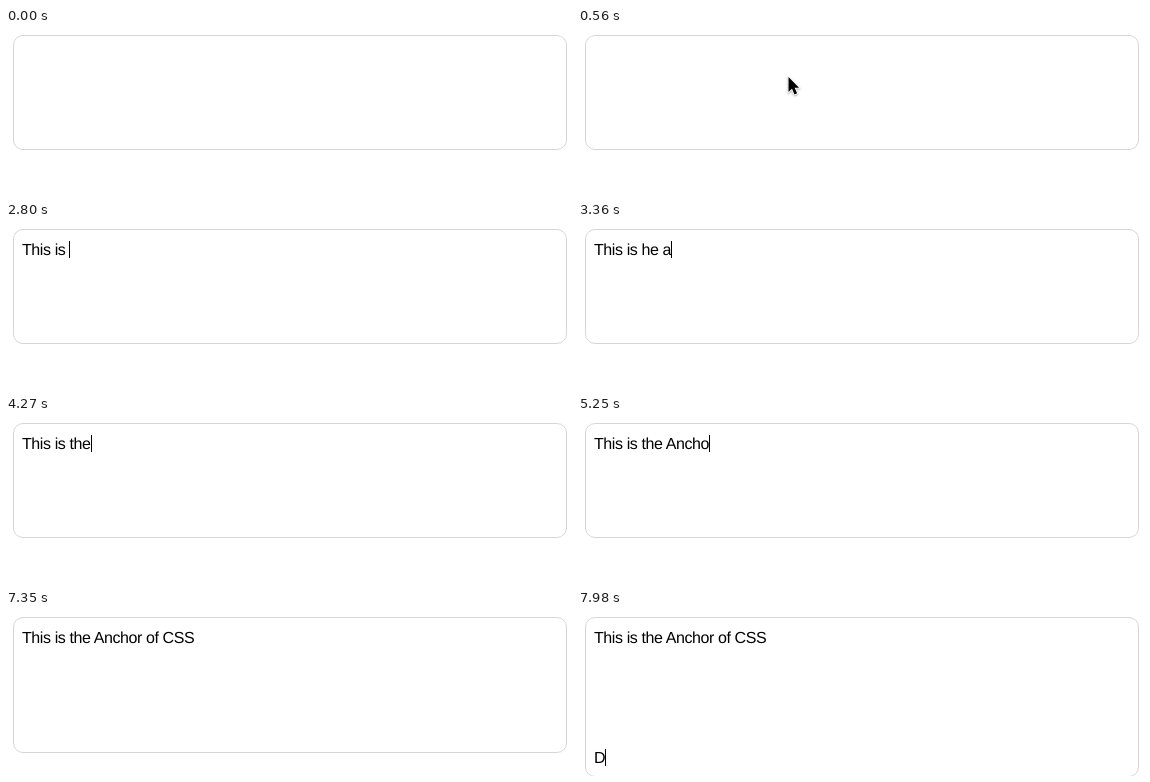
These frames come from a looping animation (566 by 166 pixels, 8 s). An HTML page with a canvas:

```html
<!DOCTYPE html>
<html lang="en">
<head>
<meta charset="utf-8">
<title>Growing text box</title>
<style>
  html, body { margin: 0; width: 100%; height: 100%; overflow: hidden; background: #fff; }
  canvas { display: block; }
</style>
</head>
<body>
<canvas id="stage" width="566" height="166"></canvas>
<script>
const LOOP = 8000, TICK = 70, LINE = 24;
const FOCUS = 630, BLINK = 560;
const ctx = document.getElementById('stage').getContext('2d');

// Keystrokes spread evenly from start to end, snapped to the tick; "<" is backspace.
const run = (start, end, keys) => [...keys].map((key, i) => ({
  key,
  time: start + Math.round((end - start) * i / Math.max(1, keys.length - 1) / TICK) * TICK
}));

const strokes = [
  ...run(2100, 3010, 'This is he'),
  ...run(3150, 3360, ' a'),
  ...run(3570, 3780, '<<<<'),
  ...run(3920, 3990, 'th'),
  ...run(4200, 4620, 'e An'),
  ...run(5040, 6020, 'chor of CS'),
  ...run(6230, 6580, 'S\n\n\n'),
  ...run(6860, 6860, '\n'),
  ...run(7490, 7490, '\n'),
  ...run(7980, 7980, 'D')
];

function textAt(t) {
  return strokes.filter(s => s.time <= t).reduce(
    (text, s) => s.key === '<' ? text.slice(0, -1) : text + s.key, '');
}

function caretOn(t) {
  if (t < FOCUS) return false;
  if (t < 2100) return Math.floor((t - FOCUS) / BLINK) % 2 === 0;
  return t < 7350 || t >= 7490;
}

function drawBox(lines) {
  const height = Math.max(115, lines * LINE + 16);
  ctx.strokeStyle = '#d6d6d6';
  ctx.lineWidth = 1;
  ctx.beginPath();
  ctx.roundRect(7.5, 7.5, 553, height - 1, 9.5);
  ctx.stroke();
}

function drawText(text, showCaret) {
  const lines = text.split('\n');
  ctx.font = '16px "Liberation Sans", Arial, sans-serif';
  ctx.letterSpacing = '-0.4px';
  ctx.fontKerning = 'normal';
  ctx.textRendering = 'geometricPrecision';
  ctx.fillStyle = '#000';
  lines.forEach((line, i) => ctx.fillText(line, 16, 33 + i * LINE));
  if (!showCaret) return;
  const row = lines.length - 1;
  const x = Math.round(16 + ctx.measureText(lines[row]).width);
  ctx.fillRect(x, (text ? 19 : 20) + row * LINE, 1, 17);
}

const arrow = new Path2D('M0 0V15L3.5 11.8L6 17.4L8.6 16.3L6.1 10.8H10.6Z');

function drawPointer(t) {
  if (t < 140 || t >= FOCUS) return;
  const rest = (1 - (t - 140) / 420) ** 2;
  ctx.save();
  ctx.translate(210.5 + 38 * rest, 49 + 92 * rest);
  ctx.shadowColor = 'rgba(0,0,0,.35)';
  ctx.shadowBlur = 2;
  ctx.shadowOffsetY = 1;
  ctx.strokeStyle = '#fff';
  ctx.lineWidth = 1.6;
  ctx.stroke(arrow);
  ctx.shadowColor = 'transparent';
  ctx.fillStyle = '#000';
  ctx.fill(arrow);
  ctx.restore();
}

function draw(now) {
  const t = Math.floor(now % LOOP / TICK) * TICK;
  const text = textAt(t);
  ctx.clearRect(0, 0, 566, 166);
  drawBox(text.split('\n').length);
  drawText(text, caretOn(t));
  drawPointer(t);
}

let begin;
function frame(now) {
  begin ??= now;
  draw(now - begin);
  requestAnimationFrame(frame);
}
draw(0);
requestAnimationFrame(frame);
</script>
</body>
</html>
```
